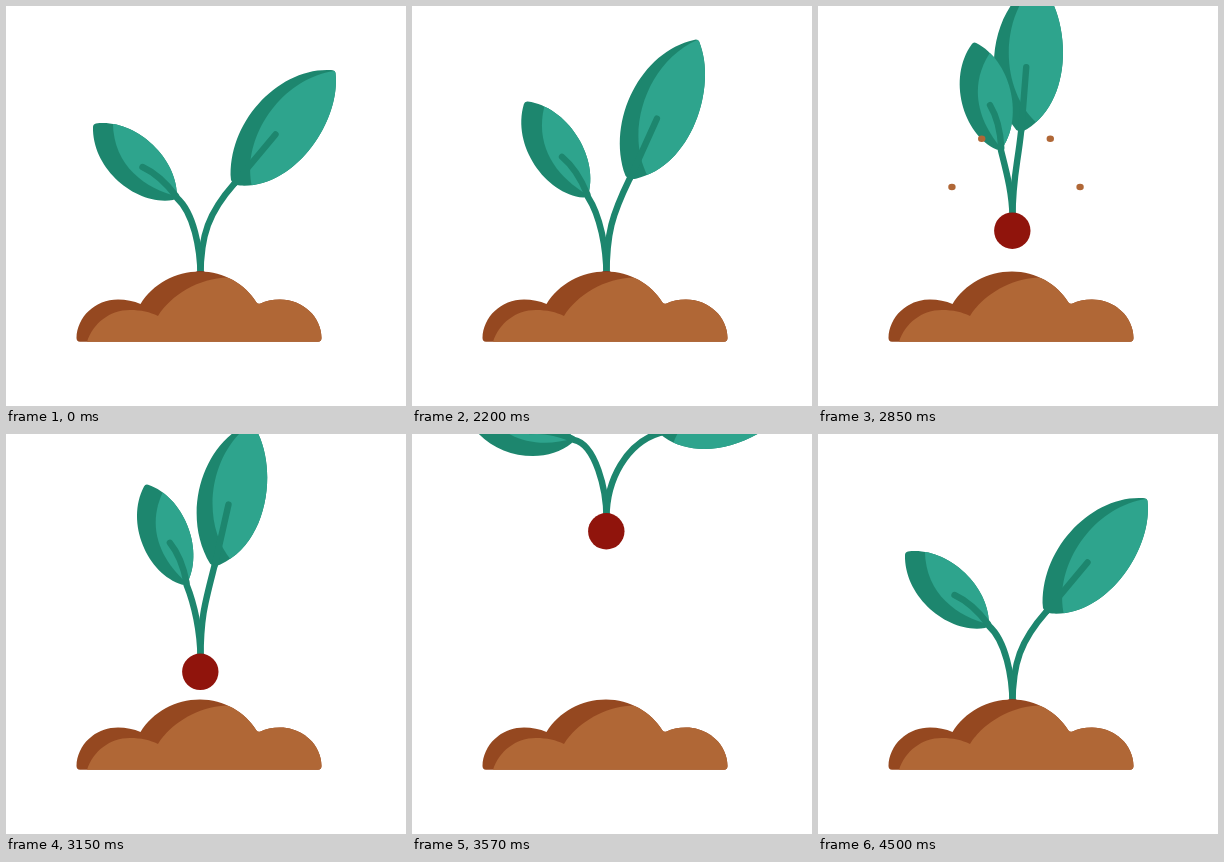
Recreate the animation shown at these times as an HTML page. Size 400 by 400 pixels, loop 4.52 s.

```html
<!DOCTYPE html>
<html lang="en">
<head>
<meta charset="utf-8">
<title>Sprout</title>
<style>
  html, body { margin: 0; width: 100%; height: 100%; overflow: hidden; background: #fff; }
  svg { display: block; width: 100%; height: 100%; }
  .dark { fill: #1d866e; }
  .light { fill: #2ea48d; }
  .stem { fill: none; stroke: #1d866e; stroke-width: 6.4; stroke-linecap: round; vector-effect: non-scaling-stroke; }
  .soil { fill: #b06736; }
  .shade { fill: #954820; }
  .root { fill: #90140c; }
</style>
</head>
<body>
<svg viewBox="0 0 400 400">
  <defs>
    <path id="rightShape" d="M225 174C221 116 273 61 325 64Q329 64 329.500 67C335 115 289 183 234 179.500Q227 179 225 174Z"/>
    <path id="leftShape" d="M171 188C170 150 128 112.500 90 117.500Q87 118 87 121C86 163 130 200 167 194Q171 193 171 188Z"/>
    <path id="moundShape" d="M74 335.700Q70.500 335.700 70.500 332C71 311 89 293.500 112 293.500C120 293.500 128 295 134.500 298C147 278 169 265.500 194 265.500C218 265.500 239 278 250.500 296.500Q252 298.500 254.500 297.500C260 295 266 293.500 274 293.500C297 293.500 315.500 311 315.500 332Q315.500 335.700 312 335.700Z"/>
    <clipPath id="rightClip"><use href="#rightShape"/></clipPath>
    <clipPath id="leftClip"><use href="#leftShape"/></clipPath>
    <clipPath id="moundClip"><use href="#moundShape"/></clipPath>
  </defs>

  <path id="rightStem" class="stem"/>
  <path id="leftStem" class="stem"/>
  <g id="rightLeaf">
    <use href="#rightShape" class="dark"/>
    <path class="light" clip-path="url(#rightClip)" d="M328 65C274 73 235 133 246 181L360 220V60Z"/>
    <path class="stem" d="M229 177L269.500 128.500"/>
  </g>
  <g id="leftLeaf">
    <use href="#leftShape" class="dark"/>
    <path class="light" clip-path="url(#leftClip)" d="M107 112C105 160 140 183 173 191L190 100Z"/>
    <path class="stem" d="M170 190Q154 169 136.500 161"/>
  </g>
  <circle id="root" class="root" r="18.200"/>
  <g id="crumbs"></g>
  <use href="#moundShape" class="shade"/>
  <path class="soil" clip-path="url(#moundClip)" d="M81 336C87 317 104 304 124 304C135 304 144 306 152 310C165 289 193 272 222 271.500L240 262L330 280V336Z"/>
</svg>
<script>
const LOOP = 4520, REGROW = 3660, X = 194.5, GROUND = 266;
const $ = id => document.getElementById(id);
const part = (t, a, b) => Math.min(1, Math.max(0, (t - a) / (b - a)));
const smooth = (t, a, b) => { const p = part(t, a, b); return p * p * (3 - 2 * p); };

// Open position of each leaf joint, and how far folding moves it
const right = { name: 'right', x: 228, y: 178, angle: 41.5, turn: -35.5, shift: -25, lift: 8, rise: 0.42, bend: 0.43 };
const left = { name: 'left', x: 171, y: 192, angle: -48.3, turn: 34.5, shift: 12, lift: 0, rise: 0.32, bend: 0.3 };

function drawSide(s, { base, fold, size, stem }) {
  const angle = s.angle + s.turn * fold, rad = angle * Math.PI / 180;
  const height = (GROUND - s.y + s.lift * fold) * stem;
  const x = X + (s.x - X + s.shift * fold) * size, y = base - height;
  const cx = x - Math.sin(rad) * height * s.bend, cy = y + Math.cos(rad) * height * s.bend;
  $(s.name + 'Stem').setAttribute('d',
    `M${X} ${base + 4}C${X} ${base - height * s.rise} ${cx} ${cy} ${x} ${y}`);
  $(s.name + 'Leaf').setAttribute('transform',
    `translate(${x} ${y}) rotate(${angle}) scale(${size}) rotate(${-s.angle}) translate(${-s.x} ${-s.y})`);
}

// Stretch, pop out of the soil, sink back, then shoot off the top
function pulled(t) {
  const stretch = smooth(t, 2000, 2500), pop = smooth(t, 2540, 2740);
  const sink = smooth(t, 2820, 3400), shot = part(t, 3400, REGROW) ** 2;
  return {
    base: GROUND - 59 * pop + 22 * sink - 345 * shot,
    fold: smooth(t, 1990, 2450) - 0.39 * sink - 1.5 * smooth(t, 3400, 3560),
    size: 1 + 0.065 * (stretch - pop) - 0.045 * sink,
    stem: 1 + 0.05 * stretch - 0.2 * pop + 0.15 * sink
  };
}

// A new sprout unfolds, slowing down as it reaches full size
function grown(t) {
  const rest = 1 - part(t, REGROW, LOOP);
  const size = Math.max(0.01, 1 - rest ** 3.3);
  return { base: GROUND + 10 * rest ** 8, fold: rest ** 2.8, size, stem: size };
}

const crumbs = [];
for (const side of [-1, 1]) {
  for (const far of [0, 1]) {
    const el = document.createElementNS('http://www.w3.org/2000/svg', 'ellipse');
    el.setAttribute('class', 'soil');
    el.setAttribute('rx', 3.7);
    el.setAttribute('ry', 3.3);
    $('crumbs').appendChild(el);
    crumbs.push({ el, reach: side * (61 + 53 * far), jump: 187 - 49 * far });
  }
}

function draw(t) {
  const pose = t < REGROW ? pulled(t) : grown(t);
  drawSide(right, pose);
  drawSide(left, pose);
  $('root').setAttribute('cx', X - 0.2);
  $('root').setAttribute('cy', pose.base + 17.5);

  const p = part(t, 2570, 3070);
  $('crumbs').setAttribute('display', p > 0 && p < 1 ? 'inline' : 'none');
  for (const { el, reach, jump } of crumbs) {
    el.setAttribute('cx', 198 + reach * p);
    el.setAttribute('cy', 300 + 30 * p - jump * 4 * p * (1 - p));
  }
}

const start = performance.now();
function tick() {
  draw((performance.now() - start) % LOOP);
  requestAnimationFrame(tick);
}
draw(0);
requestAnimationFrame(tick);
</script>
</body>
</html>
```
